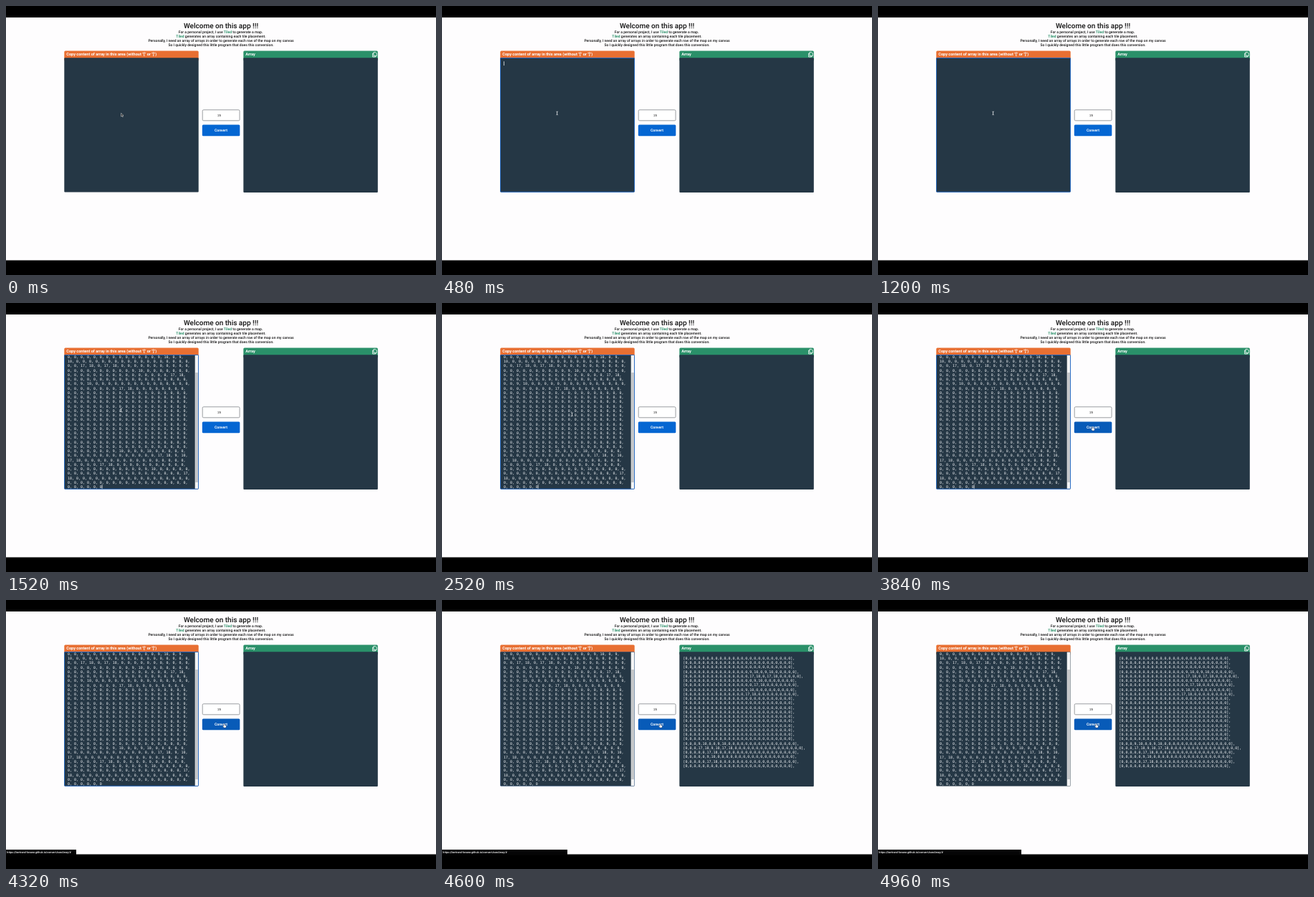
Write an HTML page that moves like this. It is 600 px wide and 375 px high and loops after 5.92 s.

```html
<!DOCTYPE html>
<html lang="en">
<head>
<meta charset="utf-8">
<title>Array converter</title>
<style>
  html, body { margin: 0; width: 100%; height: 100%; overflow: hidden; background: #000; }
  svg { display: block; width: 100vw; height: 100vh; }
  text { font: 500 5px Roboto, Arial, sans-serif; text-rendering: geometricPrecision; fill: #111; }
  .mid { text-anchor: middle; }
  .head { font-size: 5.55px; font-weight: 600; fill: #fff; }
  .code text { font: 400 4.98px "DejaVu Sans Mono", "Liberation Mono", monospace; fill: #f4f6f8; }
  .link { fill: #2a9069; font-weight: 700; }
</style>
</head>
<body>
<svg viewBox="0 0 600 375">
  <defs>
    <clipPath id="area"><rect x="81" y="72.4" width="188" height="186.8"/></clipPath>
  </defs>
  <rect y="16" width="600" height="338.5" fill="#fefdfe"/>

  <text class="mid" x="300" y="31.3" style="font-size:10px">Welcome on this app !!!</text>
  <text class="mid" x="299.5" y="38.3">For a personal project, I use <tspan class="link">Tiled</tspan> to generate a map.</text>
  <text class="mid" x="300" y="44.4"><tspan class="link">Tiled</tspan> generates an array containing each tile placement.</text>
  <text class="mid" x="300" y="50.3">Personally, I need an array of arrays in order to generate each row of the map on my canvas</text>
  <text class="mid" x="300" y="56.3">So I quickly designed this little program that does this conversion.</text>

  <!-- input panel -->
  <rect x="81.3" y="62.6" width="187.4" height="14" rx="1.5" fill="#e86f32"/>
  <rect x="81.3" y="72.3" width="187.4" height="187.1" rx="1" fill="#253745"/>
  <text class="head" x="84.3" y="69.2">Copy content of array in this area (without "[" or "]")</text>
  <g id="pasted" class="code" clip-path="url(#area)">
    <rect x="263.7" y="72.3" width="4.7" height="187" fill="#f5f5f5"/>
    <rect x="264.3" y="97" width="3.5" height="153" fill="#c3c5c7"/>
  </g>
  <rect id="caret" width=".7" height="5.8" fill="#fff"/>
  <rect id="focus" x="81.5" y="72.5" width="187" height="186.8" rx="1" fill="none" stroke="#2269c8" stroke-width=".9"/>

  <!-- output panel -->
  <rect x="331.3" y="62.6" width="187.5" height="14" rx="1.5" fill="#2a9069"/>
  <rect x="331.3" y="72.3" width="187.5" height="187.7" rx="1" fill="#253745"/>
  <text class="head" x="334.3" y="69.2">Array</text>
  <g fill="#2a9069" stroke="#fff" stroke-width=".8" stroke-linejoin="round">
    <path d="M511.6 66v5h4v-5z"/>
    <path d="M513 64.4v5.2h4.2v-3.6l-1.6-1.6z"/>
  </g>
  <g id="result" class="code"></g>

  <!-- controls -->
  <rect x="274.2" y="144.8" width="51.8" height="15" rx="1.5" fill="#fff" stroke="#70757a" stroke-width=".7"/>
  <text class="mid" x="297.6" y="153.9" style="font-size:4.2px;font-weight:400">25</text>
  <rect id="button" x="273.8" y="165.5" width="52.5" height="15.7" rx="1.5"/>
  <text class="mid" x="300" y="175.2" style="fill:#fff;font-weight:600;font-size:5.1px">Convert</text>

  <!-- link preview -->
  <g id="status">
    <rect id="bar" y="348" height="7.6" fill="#050506"/>
    <text x="1.3" y="353.1" style="font-size:3.75px;fill:#fff">https://bertrand-lovane.github.io/convertJsonArray/#</text>
  </g>

  <g id="cursor">
    <path id="arrow" d="M0 0v4.6l1.1-1 .8 1.7.8-.4-.8-1.6h1.5z" fill="#111" stroke="#fff" stroke-width=".5"/>
    <path id="beam" d="M-1.1-2.3h.7l.4.4.4-.4h.7M0-1.9v3.8M-1.1 2.3h.7l.4-.4.4.4h.7" fill="none" stroke="#fff" stroke-width=".75"/>
    <path id="hand" d="M-.6-.2q.6-.6 1.1 0v1.6l2.4.6v1.6l-.6 1.5h-2.5l-1.9-2.2q.2-.9 1.5-.2z" fill="#fff" stroke="#223" stroke-width=".35"/>
  </g>
</svg>
<script>
const LOOP = 5920, SIZE = 25, LINE = 6.25, WRAP = 57;
const BLINK = 500, CLICK = 280, PASTE = 1440, HOVER = 3240, CONVERT = 4480;
const $ = id => document.getElementById(id);

// Each tree is a 2x2 block of tiles at [column, row].
const trees = [[15, 3], [18, 3], [16, 5], [14, 7], [3, 19], [7, 19], [5, 20], [5, 22]];
const tiles = Array.from({ length: SIZE }, () => Array(SIZE).fill(0));
for (const [c, r] of trees) {
  tiles[r].splice(c, 2, 9, 10);
  tiles[r + 1].splice(c, 2, 17, 18);
}

function wrap(words) {
  const lines = [];
  let line = "";
  for (const word of words) {
    const next = line ? line + " " + word : word;
    if (next.length > WRAP) {
      lines.push(line);
      line = word;
    } else line = next;
  }
  return [...lines, line];
}

function addLines(parent, lines, x, y) {
  lines.forEach((line, i) => {
    const el = document.createElementNS("http://www.w3.org/2000/svg", "text");
    el.setAttribute("x", x);
    el.setAttribute("y", y + i * LINE);
    el.textContent = line;
    parent.append(el);
  });
}

addLines($("pasted"), wrap(tiles.flat().join(", ").split(" ")).slice(-30), 86, 76.8);
addLines($("result"), tiles.map(row => `[${row}],`), 336.6, 82.8);

// time, x, y of the pointer tip
const path = [
  [0, 160.6, 149.4], [2320, 160.6, 149.4], [2520, 181.3, 155.2], [2880, 236, 166.5],
  [3280, 276.6, 170.6], [3480, 290, 172.5], [4040, 304.4, 173]
];

const ramp = (t, from, to) => Math.min(1, Math.max(0, (t - from) / (to - from)));
const easeOut = p => 1 - (1 - p) ** 2;
const show = (id, on) => $(id).setAttribute("visibility", on ? "visible" : "hidden");
const mix = (a, b, p) => `rgb(${a.map((v, i) => Math.round(v + (b[i] - v) * p))})`;

function pointer(t) {
  const i = path.findIndex(p => p[0] > t);
  if (i < 0) return path[path.length - 1].slice(1);
  const [t0, x0, y0] = path[i - 1], [t1, x1, y1] = path[i];
  const p = ramp(t, t0, t1);
  return [x0 + (x1 - x0) * p, y0 + (y1 - y0) * p];
}

function draw(t) {
  const [x, y] = pointer(t);
  const onButton = x > 274, onArea = t >= CLICK && x < 269;
  $("cursor").setAttribute("transform", `translate(${x} ${y})`);
  show("hand", onButton);
  show("beam", onArea);
  show("arrow", !onButton && !onArea);

  const pasted = t >= PASTE;
  const phase = Math.floor((t - (pasted ? PASTE + 20 : CLICK + 20)) / BLINK);
  show("pasted", pasted);
  show("caret", t >= CLICK && t < CONVERT && phase % 2 === 0);
  $("caret").setAttribute("x", pasted ? 133.7 : 86.2);
  $("caret").setAttribute("y", pasted ? 253.2 : 77.2);

  $("focus").setAttribute("opacity", ramp(t, CLICK, CLICK + 160) - ramp(t, CONVERT, CONVERT + 160));
  $("button").setAttribute("fill", mix([4, 102, 210], [8, 91, 184], ramp(t, HOVER - 80, HOVER + 40)));

  show("result", t >= CONVERT + 40);
  $("status").setAttribute("opacity", ramp(t, 4160, 4320));
  $("bar").setAttribute("width", 98 + 102 * easeOut(ramp(t, CONVERT, CONVERT + 240)));
}

const start = performance.now();
function tick() {
  draw((performance.now() - start) % LOOP);
  requestAnimationFrame(tick);
}
tick();
</script>
</body>
</html>
```
